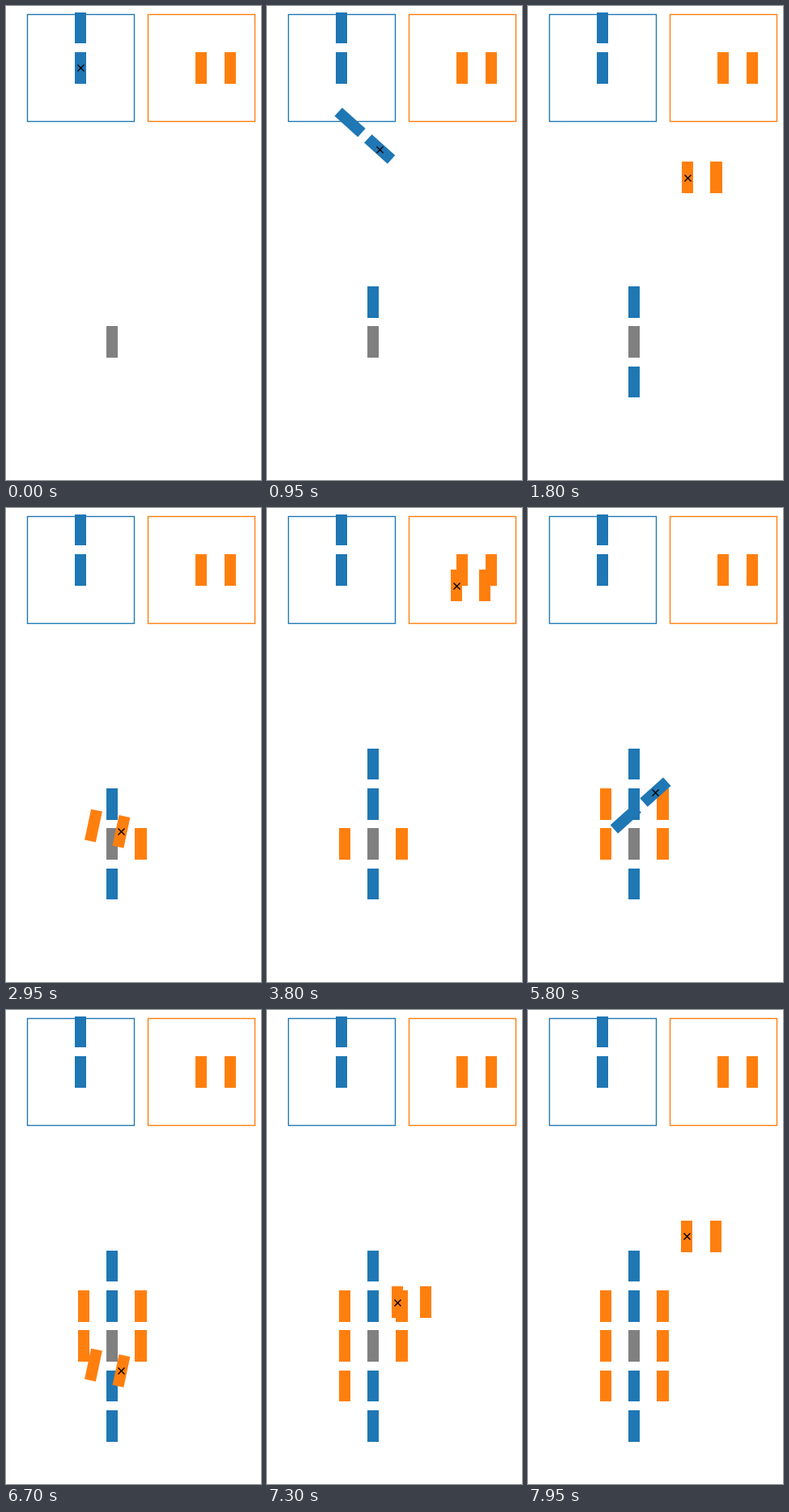
An HTML page with a canvas that plays this animation: 315x585 px, repeating every 8000 ms.

```html
<!DOCTYPE html>
<html lang="en">
<head>
<meta charset="utf-8">
<title>Block assembly</title>
<style>
  html, body { margin: 0; width: 100%; height: 100%; overflow: hidden; background: #fff; }
  canvas { display: block; }
</style>
</head>
<body>
<canvas id="stage" width="315" height="585"></canvas>
<script>
const ctx = document.getElementById('stage').getContext('2d');
const BLOCK_W = 14.1, BLOCK_H = 38.7;
const GAP_X = 35.27, GAP_Y = 49.3;
const STEP_MS = 50, STEPS_PER_MOVE = 15, LOOP_STEPS = 160;

// Each kind is a pair of blocks: an anchor at (x, y) and a partner offset by (dx, dy).
const BLUE = { color: '#1f77b4', x: 92.1, y: 76.4, dx: 0, dy: -GAP_Y };
const ORANGE = { color: '#ff7f0e', x: 241.3, y: 76.4, dx: GAP_X, dy: 0 };

// Column and row of the anchor's destination; a flipped pair makes a half turn on the way.
const MOVES = [
  [BLUE, 0, 0, false],
  [BLUE, 0, 0, true],
  [ORANGE, 0, 0, false],
  [ORANGE, 0, 0, true],
  [BLUE, 0, -1, false],
  [ORANGE, 0, -1, false],
  [ORANGE, 0, -1, true],
  [BLUE, 0, 1, true],
  [ORANGE, 0, 1, true],
  [ORANGE, 0, 1, false],
  [ORANGE, 1, 0, false],
].map(([kind, col, row, flip]) => {
  const sign = flip ? -1 : 1;
  return {
    kind, flip,
    x: 131.2 + col * GAP_X + sign * kind.dx,
    y: 414.6 + row * GAP_Y + sign * kind.dy,
  };
});

const lerp = (a, b, p) => a + (b - a) * p;

function drawBlock(x, y, color, angle = 0) {
  ctx.fillStyle = color;
  if (angle === 0) {
    // Upright blocks sit on whole pixels.
    const left = Math.round(x - BLOCK_W / 2), top = Math.round(y - BLOCK_H / 2);
    ctx.fillRect(left, top,
      Math.round(x + BLOCK_W / 2) - left, Math.round(y + BLOCK_H / 2) - top);
    return;
  }
  ctx.save();
  ctx.translate(x, y);
  ctx.rotate(angle);
  ctx.fillRect(-BLOCK_W / 2, -BLOCK_H / 2, BLOCK_W, BLOCK_H);
  ctx.restore();
}

function drawTray(kind, left) {
  ctx.strokeStyle = kind.color;
  ctx.strokeRect(left + 0.5, 10.5, 132, 132);
  drawBlock(kind.x, kind.y, kind.color);
  drawBlock(kind.x + kind.dx, kind.y + kind.dy, kind.color);
}

function drawCross(x, y) {
  const cx = Math.round(x) + 0.5, cy = Math.round(y) + 0.5;
  ctx.strokeStyle = '#000';
  ctx.beginPath();
  ctx.moveTo(cx - 4, cy - 4);
  ctx.lineTo(cx + 4, cy + 4);
  ctx.moveTo(cx - 4, cy + 4);
  ctx.lineTo(cx + 4, cy - 4);
  ctx.stroke();
}

// The partner travels in a straight line while the anchor turns around it.
function drawMovingPair({ kind, flip, x, y }, progress) {
  const angle = flip ? -Math.PI * progress : 0;
  const cos = Math.cos(angle), sin = Math.sin(angle);
  const px = lerp(kind.x + kind.dx, x, progress);
  const py = lerp(kind.y + kind.dy, y, progress);
  const ax = px - (kind.dx * cos - kind.dy * sin);
  const ay = py - (kind.dx * sin + kind.dy * cos);
  drawBlock(ax, ay, kind.color, angle);
  drawBlock(px, py, kind.color, angle);
  drawCross(ax, ay);
}

function draw(time) {
  const step = Math.floor(time / STEP_MS) % LOOP_STEPS;
  const current = Math.floor(step / STEPS_PER_MOVE);
  ctx.fillStyle = '#fff';
  ctx.fillRect(0, 0, 315, 585);
  ctx.lineWidth = 1.39;
  drawTray(BLUE, 26);
  drawTray(ORANGE, 175);
  drawBlock(131.2, 414.6, '#808080');
  for (const { kind, x, y } of MOVES.slice(0, current)) drawBlock(x, y, kind.color);
  drawMovingPair(MOVES[current], (step % STEPS_PER_MOVE) / STEPS_PER_MOVE);
}

const start = performance.now();
function tick() {
  draw(performance.now() - start);
  requestAnimationFrame(tick);
}
tick();
</script>
</body>
</html>
```
